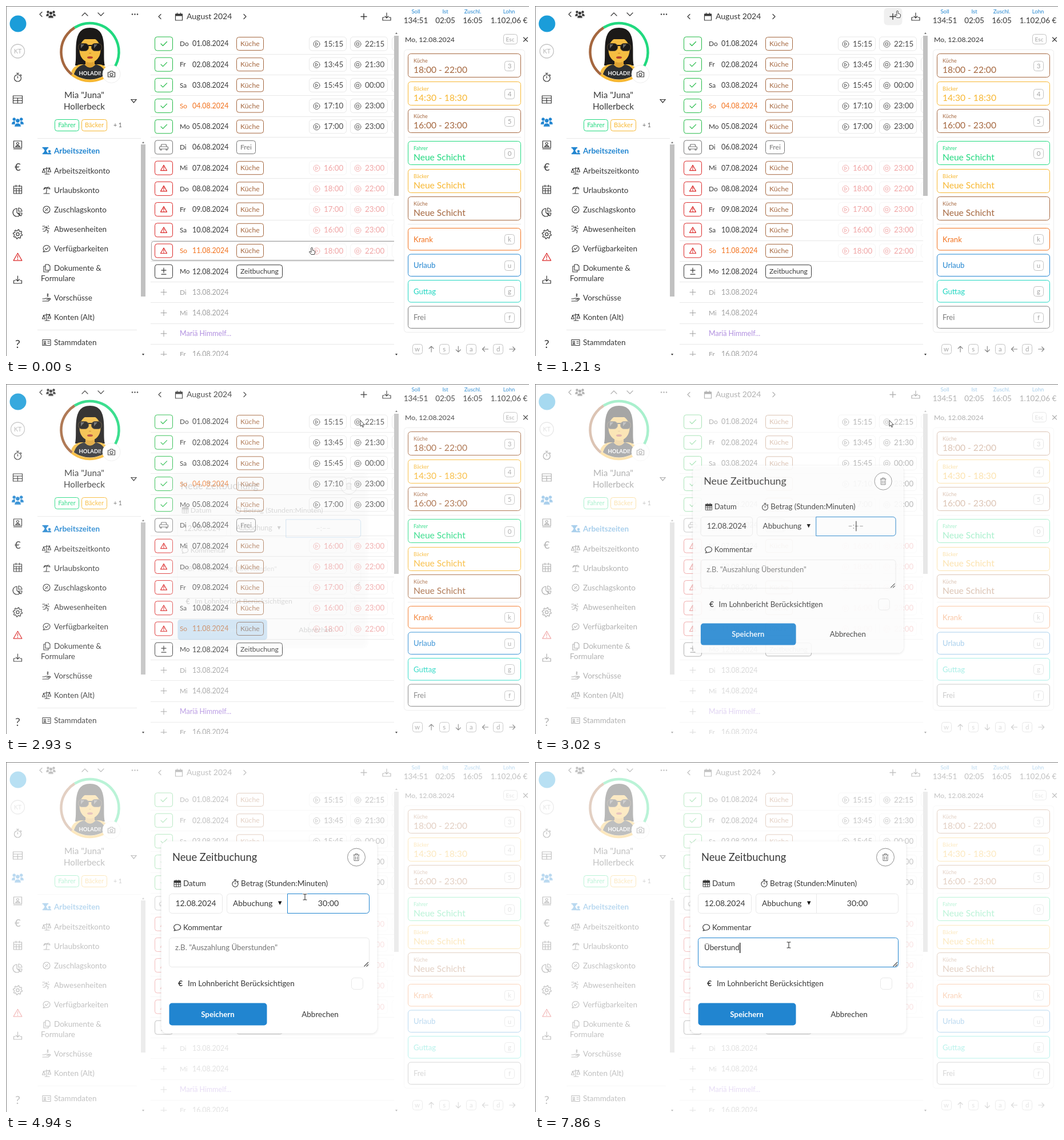
An HTML page with a canvas for the animation above (7.99 s loop, 915 by 612 pixels).

```html
<!DOCTYPE html>
<html lang="de">
<head>
<meta charset="utf-8">
<title>Zeitbuchung</title>
<style>
html, body { margin: 0; width: 100%; height: 100%; overflow: hidden; background: #fff; }
canvas { display: block; width: 915px; height: 612px; }
</style>
</head>
<body>
<canvas id="stage"></canvas>
<script>
const W = 915, H = 612, LOOP = 7990;
const INK = '#383838', LINE = '#e8e8e8', BLUE = '#2185d0', GREEN = '#21ba45',
  MINT = '#21d97f', YELLOW = '#f7b731', BROWN = '#a5673f', ORANGE = '#f2711c', RED = '#db2828', TEAL = '#1fd6c1';
const canvas = document.getElementById('stage');
const ctx = canvas.getContext('2d');
const dpr = window.devicePixelRatio || 1;
canvas.width = W * dpr;
canvas.height = H * dpr;

const ICON = {
  check: 'M-5 0L-1.5 3.5L5.5-3.5',
  warn: 'M0-5L5.5 4.5H-5.5ZM0-2V1M0 2.4V3.2',
  car: 'M-5-1L-4-5H4L5-1M-7.5 0Q-7.5-1-6-1H6Q7.5-1 7.5 0V3H-7.5ZM-6 3V5H-4V3M6 3V5H4V3',
  plusMinus: 'M0-6V2M-4-2H4M-4 5H4',
  plus: 'M0-5V5M-5 0H5',
  play: 'M5.5 0A5.5 5.5 0 1 1-5.5 0A5.5 5.5 0 1 1 5.5 0M-1.5-2.5L2.5 0L-1.5 2.5Z',
  stop: 'M5.5 0A5.5 5.5 0 1 1-5.5 0A5.5 5.5 0 1 1 5.5 0M-2-2H2V2H-2Z',
  download: 'M0-7V2M-3-1L0 2L3-1M-4 1H-7V6H7V1H4',
  calendar: 'M-6-5H6V6H-6ZM-6-2H6M-3-7V-4M3-7V-4',
  grid: 'M-7-6H7V7H-7ZM-7-2H7M-7 2H7M-2.5-2V7M2.5-2V7M-3-8V-5M3-8V-5',
  stopwatch: 'M6 1A6 6 0 1 1-6 1A6 6 0 1 1 6 1M0 1V-2M-2-7.5H2M0-7V-5M5-5L6.5-3.5',
  table: 'M-8-6H8V7H-8ZM-8-2H8M-8 2.5H8M0-2V7',
  portrait: 'M-7-6H7V6H-7ZM-4 4Q0 0 4 4ZM2-1.5A2 2 0 1 1-2-1.5A2 2 0 1 1 2-1.5M-7 8H7',
  idCard: 'M-7-5H7V5H-7ZM-5 3Q-3 0-1 3ZM-1.5-1A1.5 1.5 0 1 1-4.5-1A1.5 1.5 0 1 1-1.5-1M2-2H5M2 1H5',
  pie: 'M-1-6A7 7 0 1 0 4 6L-1 1ZM2-7A7 7 0 0 1 8-1H2ZM2 2H8Q8 5 6 7Z',
  people: 'M-3-4A2 2 0 1 1-7-4A2 2 0 1 1-3-4M7-4A2 2 0 1 1 3-4A2 2 0 1 1 7-4M2.5-2A2.5 2.5 0 1 1-2.5-2A2.5 2.5 0 1 1 2.5-2M-8 2Q-8-1-4-1V3H-8ZM8 2Q8-1 4-1V3H8ZM-4 6Q-4 2 0 2Q4 2 4 6Z',
  hourglass: 'M-7-6H3V-4.5H2L-1 0L2 4.5V6H-7V4.5H-6L-3 0L-6-4.5H-7ZM7 1A2 2 0 1 1 3 1A2 2 0 1 1 7 1M2 6Q2 3.5 5 3.5Q8 3.5 8 6Z',
  scales: 'M-6-3L6-5M0-6V6M-3 6H5M-5-3L-7.5 3H-2.5ZM5-5L2.5 2H7.5Z',
  palm: 'M-1 6Q1 1 0-3M-5-1Q-4-6 0-4Q5-7 6-2Q3-3 0-4Q-3-4-5-1M-5 6H5',
  percent: 'M6 0A6 6 0 1 1-6 0A6 6 0 1 1 6 0M-2 2L2-2M-2-2V-1.4M2 2V1.4',
  runner: 'M3-6V-4.5M-4-2L0-4L2-1L5-1M0-4L-1 1L3 3L2 7M-1 1L-3 4H-6M-7-5H-3M-7 0H-5',
  bubbleCheck: 'M-4 4A6 5.5 0 1 1 0 5.5L-6 6ZM-2.5 0L-.5 2L3-2',
  pages: 'M-2-6H3L6-3V4H-2ZM-2-3H-5V7H3V4',
  hand: 'M-7 2H-4L-1 1H3V3H0M-7 6H3L7 2L5 1L3 3M1-6H3L1-3H3M2-7V-2',
  trash: 'M-5-4H5M-2-4V-6H2V-4M-4-4V6H4V-4M-1.5-1V4M1.5-1V4',
  bubble: 'M-4 4A6 5 0 1 1 0 5L-6 6Z',
  book: 'M-4-6H5V6H-4Q-5 6-5 4V-5ZM-5 4H5M-2-3H3M-2 0H3',
  camera: 'M-6-3H-3L-2-5H2L3-3H6V5H-6ZM2.5 1A2.5 2.5 0 1 1-2.5 1A2.5 2.5 0 1 1 2.5 1',
  left: 'M2-4L-2 0L2 4', right: 'M-2-4L2 0L-2 4', up: 'M-5 2.5L0-2.5L5 2.5', down: 'M-5-2.5L0 2.5L5-2.5',
  close: 'M-3.5-3.5L3.5 3.5M3.5-3.5L-3.5 3.5',
  arrowUp: 'M0 5V-5M-4-1L0-5L4-1',
  pointer: 'M-1.2 1Q0-.6 1.2 1V5L4.5 6Q6 6.5 5.5 9L4.5 12.5H-1L-4.5 8Q-4 6.5-2.8 7.2L-1.2 8.5Z',
  arrow: 'M0 0V10L2.3 8L4 11.5L5.5 11L4 7.3H7Z',
  beam: 'M-3-5H-1L0-4.5L1-5H3M0-4.5V4.5M-3 5H-1L0 4.5L1 5H3'
};
const shapes = {};
for (const k in ICON) shapes[k] = new Path2D(ICON[k]);

function icon(name, x, y, color = INK, width = 1.2, fill = null, scale = 1, turn = 0) {
  ctx.save();
  ctx.translate(x, y);
  ctx.scale(scale, scale);
  ctx.rotate(turn);
  ctx.lineJoin = ctx.lineCap = 'round';
  if (fill) { ctx.fillStyle = fill; ctx.fill(shapes[name]); }
  ctx.strokeStyle = color;
  ctx.lineWidth = width;
  ctx.stroke(shapes[name]);
  ctx.restore();
}
function text(s, x, y, size, color = INK, align = 'left', weight = 400) {
  ctx.font = `${weight} ${size}px Lato, sans-serif`;
  ctx.fillStyle = color;
  ctx.textAlign = align;
  ctx.fillText(s, x, y + size * .35);
  return ctx.measureText(s).width;
}
function box(x, y, w, h, r, stroke, fill) {
  ctx.beginPath();
  ctx.roundRect(x + .5, y + .5, w - 1, h - 1, r);
  if (fill) { ctx.fillStyle = fill; ctx.fill(); }
  if (stroke) { ctx.strokeStyle = stroke; ctx.lineWidth = 1; ctx.stroke(); }
}
function disc(x, y, r, fill, stroke, width = 1) {
  ctx.beginPath();
  ctx.arc(x, y, r, 0, 7);
  if (fill) { ctx.fillStyle = fill; ctx.fill(); }
  if (stroke) { ctx.strokeStyle = stroke; ctx.lineWidth = width; ctx.stroke(); }
}
function rect(x, y, w, h, color) { ctx.fillStyle = color; ctx.fillRect(x, y, w, h); }
function poly(points, fill, stroke) {
  ctx.beginPath();
  for (let i = 0; i < points.length; i += 2) ctx.lineTo(points[i], points[i + 1]);
  ctx.closePath();
  if (fill) { ctx.fillStyle = fill; ctx.fill(); }
  if (stroke) { ctx.strokeStyle = stroke; ctx.lineWidth = 1.2; ctx.stroke(); }
}
function ellipse(x, y, rx, ry, fill) {
  ctx.beginPath();
  ctx.ellipse(x, y, rx, ry, 0, 0, 7);
  ctx.fillStyle = fill;
  ctx.fill();
}
function blob(d, fill) {
  ctx.fillStyle = fill;
  ctx.fill(new Path2D(d));
}
function shadowed(blur, alpha, draw) {
  ctx.save();
  ctx.shadowColor = `rgba(0,0,0,${alpha})`;
  ctx.shadowBlur = blur * dpr;
  ctx.shadowOffsetY = dpr;
  draw();
  ctx.restore();
}

function gear(x, y) {
  const pts = [];
  for (let i = 0; i < 32; i++) {
    const a = (i + .5) * Math.PI / 16, r = i % 4 < 2 ? 8 : 6;
    pts.push(x + r * Math.cos(a), y + r * Math.sin(a));
  }
  poly(pts, null, INK);
  disc(x, y, 2.6, null, INK, 1.2);
}

function navBar() {
  disc(21, 31, 14.5, '#1b9dd9');
  disc(20.5, 79, 12, '#fff', '#c4c4c4', 1.3);
  text('KT', 20.5, 79, 10.5, '#b5b5b5', 'center');
  icon('stopwatch', 20.5, 125);
  icon('table', 20.5, 163);
  icon('people', 20.5, 203, BLUE, .4, BLUE, 1.25);
  icon('portrait', 20.5, 242);
  text('€', 20.5, 282, 18, INK, 'center');
  icon('grid', 20.5, 321);
  icon('pie', 20, 360);
  gear(20.5, 399);
  icon('warn', 20.5, 439, RED, .9, null, 1.35);
  icon('download', 20.5, 479);
  text('?', 20.5, 591, 20, INK, 'center');
}

function avatar() {
  const arc = (from, to, color) => {
    ctx.beginPath();
    ctx.arc(147, 80.5, 50.5, from, to);
    ctx.strokeStyle = color;
    ctx.lineWidth = 4.5;
    ctx.stroke();
  };
  ctx.save();
  ctx.beginPath();
  ctx.arc(147, 80.5, 48, 0, 7);
  ctx.clip();
  const hair = '#1b1918', skin = '#f5bd42';
  blob('M121 104C126 84 113 38 147 38C181 38 168 84 173 104Z', hair);
  blob('M111 132Q112 104 131 102H163Q182 104 183 132Z', skin);
  blob('M117 132Q118 106 137 102Q147 113 157 102Q176 106 177 132Z', '#2d2f31');
  blob('M139 92H155V103Q147 112 139 103Z', '#dfa333');
  ellipse(147, 77, 18.5, 22, skin);
  blob('M127 70Q127 45 147 44Q167 45 167 70L163 58H131Z', hair);
  box(126, 65, 19, 14, 6, '#5b4a30', hair);
  box(149, 65, 19, 14, 6, '#5b4a30', hair);
  rect(144, 68, 6, 2, hair);
  poly([131, 67, 137, 67, 131, 74], '#686868');
  poly([154, 67, 160, 67, 154, 74], '#686868');
  rect(145, 82, 4, 1, '#c5861f');
  ellipse(147, 90, 5, 2, '#b6402e');
  text('HOLADI!', 147, 117.5, 9.5, '#fff', 'center', 700);
  ctx.restore();
  arc(.6, 2.25, YELLOW);
  arc(2.25, 4.15, BROWN);
  arc(4.15, 6.9, MINT);
  disc(184.5, 119, 15.5, '#fff', '#eee');
  icon('camera', 184.5, 119);
}

function chip(s, x, w, color) {
  box(x, 198, w, 21, 4, color);
  text(s, x + w / 2, 208.5, 11, color, 'center');
}

const MENU = [['scales', 'Arbeitszeitkonto', 288], ['palm', 'Urlaubskonto', 322], ['percent', 'Zuschlagskonto', 356],
  ['runner', 'Abwesenheiten', 390], ['bubbleCheck', 'Verfügbarkeiten', 424], ['pages', 'Dokumente &', 458],
  ['hand', 'Vorschüsse', 510], ['scales', 'Konten (Alt)', 544], ['idCard', 'Stammdaten', 588.5]];

function scrollbar(x, top, y, h) {
  rect(x, y, 8, h, '#c1c1c1');
  poly([x + 2, top + 2, x + 6, top + 2, x + 4, top - 1], '#777');
  poly([x + 2, 608, x + 6, 608, x + 4, 611], '#333');
}

function sidebar() {
  icon('left', 61, 14.5);
  icon('people', 78.5, 14.5, INK, .4, INK);
  icon('up', 138, 14.5);
  icon('down', 166, 14.5);
  for (const x of [221, 225.5, 230]) disc(x, 14.5, 1.2, INK);
  avatar();
  text('Mia "Juna"', 137, 155.5, 15.2, INK, 'center');
  text('Hollerbeck', 137, 175.5, 15.2, INK, 'center');
  poly([219, 163.5, 228, 163.5, 223.5, 169], null, INK);
  chip('Fahrer', 85, 43, MINT);
  chip('Bäcker', 132, 45, YELLOW);
  text('+ 1', 188, 208.5, 10.5, '#666');
  rect(55, 231, 181, 1, LINE);
  icon('hourglass', 71, 253, BLUE, .4, BLUE);
  text('Arbeitszeiten', 84, 253.5, 13.5, BLUE, 'left', 700);
  for (const [name, label, y] of MENU) {
    icon(name, 71, y, INK, 1.1);
    text(label, 84, y, 13.5);
  }
  text('Formulare', 61, 476, 13.5);
  rect(55, 566, 174, 1, LINE);
  scrollbar(236, 238, 242, 266);
}

const DAYS = ['Do', 'Fr', 'Sa', 'So', 'Mo', 'Di', 'Mi'];
const TIMES = ['15:15 22:15', '13:45 21:30', '15:45 00:00', '17:10 23:00', '17:00 23:00', '',
  '16:00 23:00', '18:00 22:00', '17:00 23:00', '16:00 23:00', '18:00 22:00'];
const rowY = i => 66 + i * 36.2;

function badge(s, y, color) {
  ctx.font = '400 12.2px Lato, sans-serif';
  const w = Math.round(ctx.measureText(s).width) + 14;
  box(403, y - 12, w, 24, 4, color);
  text(s, 410, y, 12.2, color);
}

function row(i, hovered) {
  const y = rowY(i), top = y - 12.5;
  const done = i < 5, late = i > 5 && i < 11, future = i > 11;
  rect(253, Math.round(y + 18), 426, 1, LINE);
  if (hovered) {
    shadowed(2, .2, () => box(254, Math.round(y) - 17, 450, 34, 4, null, '#fff'));
    box(254, Math.round(y) - 17, 450, 34, 4, '#a0a0a0');
  }
  const ink = future ? '#a0a0a0' : i % 7 === 3 ? ORANGE : INK;
  if (i === 14) text('Mariä Himmelf...', 304, y, 12.5, '#b18fe0');
  else {
    text(DAYS[i % 7], 304, y, 11.8, ink);
    text(String(i + 1).padStart(2, '0') + '.08.2024', 326, y, 12.4, ink);
  }
  if (future) return icon('plus', 276, y, '#a0a0a0', 1);
  const color = done ? GREEN : late ? RED : i === 5 ? '#777' : INK;
  box(260, top, 32, 25, 4, color);
  icon(done ? 'check' : late ? 'warn' : i === 5 ? 'car' : 'plusMinus', 276, y, color);
  badge(i === 5 ? 'Frei' : i === 11 ? 'Zeitbuchung' : 'Küche', y, i === 5 ? '#777' : i === 11 ? INK : BROWN);
  if (!TIMES[i]) return;
  const tint = late ? '#f0a4a4' : '#484848', border = late ? '#f5f5f5' : LINE;
  const [from, to] = TIMES[i].split(' ');
  for (const x of [530, 602, 675]) box(x, top, 66, 25, 5, border);
  icon('play', 543.5, y + .5, tint, .9);
  icon('stop', 615.5, y + .5, tint, .9);
  text(from, 556, y, 13.3, tint);
  text(to, 628, y, 13.3, tint);
}

function list(hoverRow, plusHover) {
  if (plusHover) box(610, 3, 33, 31, 6, null, '#f0f0f0');
  icon('left', 269, 18.5);
  icon('calendar', 302.5, 19);
  rect(297, 14, 12, 3, INK);
  text('August 2024', 316, 18.5, 14);
  icon('right', 418, 18.5);
  icon('plus', 626, 18.5, INK, 1.4);
  icon('download', 666, 19);
  ctx.save();
  ctx.beginPath();
  ctx.rect(250, 44, 429, 568);
  ctx.clip();
  for (let i = 0; i < 16; i++) row(i, i === hoverRow);
  ctx.restore();
  scrollbar(679, 47, 52, 280);
}

const CARDS = [['Küche', '18:00 - 22:00', 83, BROWN, '3'], ['Bäcker', '14:30 - 18:30', 132, YELLOW, '4'],
  ['Küche', '16:00 - 23:00', 180, BROWN, '5'], ['Fahrer', 'Neue Schicht', 236, MINT, '0'],
  ['Bäcker', 'Neue Schicht', 285, YELLOW, ''], ['Küche', 'Neue Schicht', 333, BROWN, '']];
const ABSENCES = [['Krank', 388, ORANGE, 'k'], ['Urlaub', 433.5, BLUE, 'u'],
  ['Guttag', 479, TEAL, 'g'], ['Frei', 524.5, '#7d7d7d', 'f']];

function key(s, x, y, w = 18) {
  box(Math.round(x - w / 2), Math.round(y) - 9, w, 18, 4, '#c3c3c3');
  text(s, x, y, w > 18 ? 10 : 11.5, '#a5a5a5', 'center');
}

function panel() {
  const sums = [['Soll', '134:51', 717], ['Ist', '02:05', 768.5], ['Zuschl.', '16:05', 816.5], ['Lohn', '1.102,06 €', 880]];
  for (const [label, value, x] of sums) {
    text(label, x, 10, 9.6, BLUE, 'center');
    text(value, x, 25, 13.5, INK, 'center');
  }
  text('Mo, 12.08.2024', 698, 58.5, 12.3);
  key('Esc', 882, 58, 25);
  icon('close', 909, 58.5);
  box(696, 76, 212, 495, 5, '#ececec');
  rect(703, 229, 198, 1, LINE);
  rect(703, 381, 198, 1, LINE);
  for (const [role, label, y, color, k] of CARDS) {
    box(703, y, 198, 42, 5, color);
    text(role, 713, y + 12.5, 9, color);
    text(label, 713, y + 28.7, 15.6, color);
    if (k) key(k, 881, y + 22);
  }
  for (const [label, y, color, k] of ABSENCES) {
    box(703, y, 198, 39.5, 5, color);
    text(label, 713, y + 20, 13.1, color);
    key(k, 881, y + 20);
  }
  ['w', 's', 'a', 'd'].forEach((s, i) => {
    const x = 719.5 + i * 47.2;
    key(s, x, 600);
    icon('arrowUp', x + 24.6, 600, '#858585', 1.1, null, 1, [0, 2, 3, 1][i] * Math.PI / 2);
  });
}

function popup(alpha) {
  if (alpha <= 0) return;
  ctx.save();
  ctx.globalAlpha = alpha;
  shadowed(8, .2, () => box(555, 34, 143, 85, 5, null, '#fff'));
  poly([619, 35, 626, 26.5, 633, 35], '#fff');
  ctx.beginPath();
  ctx.moveTo(619, 34); ctx.lineTo(626, 26.5); ctx.lineTo(633, 34);
  ctx.strokeStyle = '#ddd';
  ctx.lineWidth = 1;
  ctx.stroke();
  box(561, 41, 131, 35, 4, null, '#dfdfdf');
  icon('book', 579, 58);
  text('Zeitbuchung', 591.5, 58.5, 12.6);
  icon('calendar', 579, 94.5, INK, 1.2, null, .85);
  rect(574, 90, 10, 2.5, INK);
  text('Urlaubsbuchung', 591.5, 94.5, 12.6);
  ctx.restore();
}

// Value of the last [time, value] step reached.
const stepAt = (steps, t) => steps.reduce((v, s) => t >= s[0] ? s[1] : v, '');
const AMOUNT = [[0, '–:––'], [3810, '–:–3'], [4040, '–:30'], [4270, '3:00'], [4420, '30:00']];
const COMMENT = [6820, 7140, 7230, 7320, 7500, 7590, 7680, 7770, 7860].map((ms, i) => [ms, 'Überstund'.slice(0, i + 1)]);
const CARET = [[2950, 1], [3480, 0], [3870, 1], [4940, 0], [5460, 1], [6260, 0], [6780, 1]];

function modal(t) {
  const p = ease((t - 2880) / 210);
  if (p <= 0) return;
  const inComment = t >= 5740, caret = stepAt(CARET, t), scale = .9 + .1 * p;
  const alpha = Math.min(1, p * 1.19);
  ctx.save();
  rect(0, 0, W, H, `rgba(255,255,255,${.69 * alpha})`);
  ctx.translate(460.5, 306.5);
  ctx.scale(scale, scale);
  ctx.translate(-460.5, -306.5);
  ctx.globalAlpha = alpha;
  shadowed(4, .12, () => box(271, 138, 379, 337, 10, null, '#fff'));
  text('Neue Zeitbuchung', 291, 166.5, 18.3);
  disc(613, 166.5, 15.5, '#fff', '#8c8c8c');
  icon('trash', 613, 166.5, '#777', 1);

  icon('grid', 300, 212.5, INK, 1.2, null, .8);
  rect(294, 207.5, 12, 3.5, INK);
  text('Datum', 310, 212.5, 13.4);
  icon('stopwatch', 401, 212.5, INK, 1.3, null, .85);
  text('Betrag (Stunden:Minuten)', 411, 212.5, 13.5);
  box(285, 230, 94, 35, 5, LINE);
  text('12.08.2024', 332, 247, 13.9, INK, 'center');
  box(386, 230, 250, 35, 5, LINE);
  text('Abbuchung', 397, 247, 13.8);
  poly([476, 243.5, 482.5, 243.5, 479.2, 250], '#111');
  rect(492, 231, 1, 33, LINE);
  if (!inComment) box(492, 230, 144, 35, [0, 5, 5, 0], BLUE);
  const amount = stepAt(AMOUNT, t);
  const w = text(amount, 564, 247, 14.2, t < 3810 ? '#8a8a8a' : INK, 'center');
  if (caret && !inComment) rect(t < 3810 ? 564 : Math.round(564 + w / 2), 238, 1, 18, '#111');

  icon('bubble', 300, 289);
  text('Kommentar', 310, 289, 13.3);
  box(285, 307, 351, 52, 5, inComment ? BLUE : LINE);
  const comment = stepAt(COMMENT, t);
  const cw = text(comment, 296, 324.5, 13.3);
  if (!comment) text('z.B. "Auszahlung Überstunden"', 296, 324.5, 13.25, '#757575');
  if (caret && inComment) rect(Math.round(296 + cw), 316, 1.3, 18, '#111');
  ctx.beginPath();
  ctx.moveTo(626.5, 357.5); ctx.lineTo(634, 350);
  ctx.moveTo(630.5, 357.5); ctx.lineTo(634, 354);
  ctx.strokeStyle = '#444';
  ctx.lineWidth = 1.1;
  ctx.stroke();

  text('€', 305, 387, 14, INK, 'center', 700);
  text('Im Lohnbericht Berücksichtigen', 318, 387, 13.5);
  box(604, 377, 21, 21, 5, LINE);
  box(285, 421, 172, 40, 5, null, BLUE);
  text('Speichern', 370.5, 441, 13.3, '#fff', 'center', 700);
  text('Abbrechen', 549.5, 441, 13.5, INK, 'center');
  ctx.restore();
}

function ease(p) {
  p = Math.max(0, Math.min(1, p));
  return p * p * (3 - 2 * p);
}
const PATH = [[0, 535, 422], [530, 535, 422], [1210, 634, 8], [1380, 635, 9], [2150, 635, 9],
  [2340, 645, 38], [2520, 609, 65], [2680, 620, 64], [3080, 620, 64], [3500, 523, 236],
  [5210, 523, 236], [5560, 444, 320], [LOOP, 444, 320]];

function cursorAt(t) {
  const i = PATH.findIndex(k => k[0] > t);
  const [t0, x0, y0] = PATH[i - 1], [t1, x1, y1] = PATH[i];
  const p = ease((t - t0) / (t1 - t0));
  return { x: x0 + (x1 - x0) * p, y: y0 + (y1 - y0) * p };
}

function cursor(t, { x, y }) {
  const within = (l, top, r, b) => x > l && x < r && y > top && y < b;
  const overField = t > 3050 && (within(492, 230, 636, 265) || within(285, 307, 636, 359));
  if (overField) {
    icon('beam', x, y, '#fff', 2.4);
    return icon('beam', x, y, '#222', 1);
  }
  const arrow = t >= 2880 || (t >= 1620 && y < 41);
  icon(arrow ? 'arrow' : 'pointer', x, y, '#333', .9, '#fff');
}

function draw(t) {
  ctx.setTransform(dpr, 0, 0, dpr, 0, 0);
  rect(0, 0, W, H, '#fff');
  const pos = cursorAt(t);
  const hoverRow = t < 1300 && pos.y > 48 ? Math.round((pos.y + 3 - 66) / 36.2) : -1;
  navBar();
  sidebar();
  list(hoverRow, t > 600 && t < 1620 && pos.y < 34);
  panel();
  popup(t < 2830 ? ease((t - 1600) / 400) : 0);
  modal(t);
  rect(0, 0, W, 1, '#858585');
  rect(0, 0, 1, H, '#858585');
  cursor(t, pos);
}

const start = performance.now();
function tick() {
  draw((performance.now() - start) % LOOP);
  requestAnimationFrame(tick);
}
tick();
</script>
</body>
</html>
```
